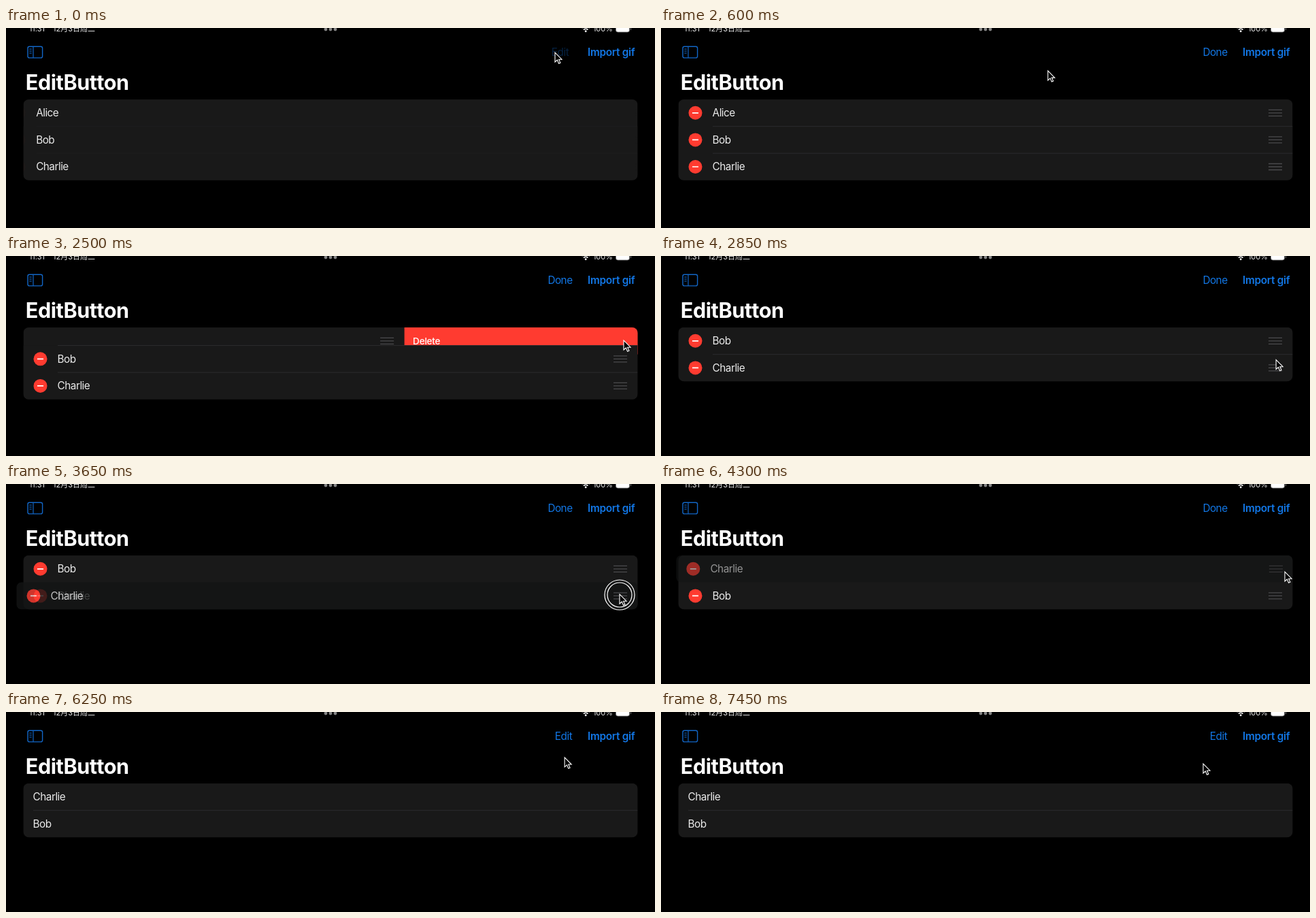
Animation of 954 by 294 pixels, one loop 7650 ms. Source, as an HTML page:

```html
<!DOCTYPE html>
<html lang="en">
<head>
<meta charset="utf-8">
<title>Editable list</title>
<style>
  html, body { margin: 0; width: 100%; height: 100%; overflow: hidden; background: #000; }
  svg { display: block; width: 954px; height: 294px; }
  text { font-family: Inter, Roboto, sans-serif; fill: #ececec; white-space: pre; }
  .name { font-size: 15.3px; letter-spacing: -.5px; }
  .title { font-size: 30.6px; font-weight: 700; letter-spacing: -.45px; fill: #fff; }
  .button { font-size: 15.3px; letter-spacing: -.5px; fill: #1277e6; text-anchor: middle; }
  .strong { font-weight: 600; letter-spacing: -.25px; text-anchor: start; }
  .delete { font-size: 13.5px; font-weight: 500; letter-spacing: -.2px; fill: #fff; }
  .status { font-size: 11px; font-family: Inter, "Noto Sans CJK SC", "Noto Sans CJK", sans-serif; }
  .line { fill: none; stroke: #1266c6; stroke-width: 1.4; }
  .separator { stroke: #2b2b2d; stroke-width: 1; }
  .handle { stroke: #4a4a4c; stroke-width: 1.3; }
</style>
</head>
<body>
<svg id="stage" viewBox="0 0 954 294"></svg>
<script>
const LOOP = 7650, STEP = 50, LAST = 7450;
const LEFT = 25.5, RIGHT = 928.5, TOP = 105, ROW = 39.6;
const ACTION = 67;

const stage = document.getElementById('stage');

const rowMarkup = (id, name, extra = '') => `
  <g id="${id}">
    ${extra}
    <g class="minus">
      <circle r="10" fill="#ff3b30"/>
      <path d="M-4.5 0H4.5" stroke="#fff" stroke-width="1.7"/>
    </g>
    <text class="name" y="5.4">${name}</text>
    <path class="handle" d="M-10 -4.5H10M-10 0H10M-10 4.5H10"/>
  </g>`;

stage.innerHTML = `
  <defs>
    <clipPath id="cardClip"><rect id="cardShape" x="${LEFT}" y="${TOP}" width="${RIGHT - LEFT}" rx="8"/></clipPath>
  </defs>
  <rect width="954" height="294"/>
  <text class="status" x="34" y="5.3" letter-spacing="-.1">11:31</text>
  <text class="status" x="69" y="5.3">12月3日周二</text>
  <g fill="#858585">
    <circle cx="470" cy="2" r="2.4"/><circle cx="477" cy="2" r="2.4"/><circle cx="484" cy="2" r="2.4"/>
  </g>
  <g fill="none" stroke="#fff" stroke-width="1.7">
    <path d="M846.5 0Q852.2 -5 858 0M849 2.5Q852.2 0 855.5 2.5"/>
    <circle cx="852.2" cy="4.8" r=".6"/>
  </g>
  <text class="status" x="863" y="5.3" letter-spacing="-.1">100%</text>
  <rect x="896.5" y="-5" width="20" height="11" rx="3" fill="#fff" stroke="#777" stroke-width=".8"/>
  <path d="M918.4 -1V3" stroke="#777"/>
  <g class="line">
    <rect x="32" y="27.3" width="21.6" height="16.6" rx="2.4"/>
    <path d="M40 27.3V44M34.3 31H37.8M34.3 34H37.8M34.3 37H37.8" stroke-width="1.2"/>
  </g>
  <text class="button" id="edit" y="41">Edit</text>
  <text class="button" id="done" y="41">Done</text>
  <text class="button strong" x="855" y="41">Import gif</text>
  <text class="title" x="28.8" y="91">EditButton</text>
  <g clip-path="url(#cardClip)">
    <rect id="card" x="${LEFT}" y="${TOP}" width="${RIGHT - LEFT}" height="${3 * ROW}" fill="#191919"/>
    ${rowMarkup('first', 'Alice')}
    <g id="action">
      <rect y="${TOP}" width="${RIGHT - LEFT}" height="${ROW}" fill="#ff3b30"/>
      <text class="delete" x="12.5" y="129.6">Delete</text>
    </g>
    <rect id="body" x="${LEFT}" width="${RIGHT - LEFT}" height="${2 * ROW}" fill="#191919"/>
    <path id="upperLine" class="separator"/>
    <path id="lowerLine" class="separator"/>
    ${rowMarkup('second', 'Bob')}
    ${rowMarkup('third', 'Charlie')}
  </g>
  ${rowMarkup('lifted', 'Charlie', `<rect class="back" y="${-ROW / 2}" height="${ROW}" rx="7" fill="#131515"/>`)}
  <g id="ring" fill="none" stroke="#fff" stroke-width="1.2">
    <circle r="22"/><circle r="18"/>
  </g>
  <path id="cursor" d="M0 0V14L3.3 11L5.6 16.2L7.9 15.2L5.6 10.2H10Z" fill="#000" stroke="#fff" stroke-width="1.1"/>
`;

const el = id => document.getElementById(id);
const set = (node, attrs) => {
  for (const key in attrs) node.setAttribute(key, attrs[key]);
};
const clamp = v => Math.max(0, Math.min(1, v));
const ramp = (t, start, length) => clamp((t - start) / length);
const ease = (t, start, length) => {
  const u = ramp(t, start, length);
  return u * u * (3 - 2 * u);
};
const mix = (a, b, u) => a + (b - a) * u;
const move = (x, y) => `translate(${x} ${y})`;

// time, x, y
const cursorPath = [
  [0, 807, 36], [300, 807, 36], [1100, 54, 121], [1500, 54, 121],
  [2050, 919, 126], [2300, 908, 124], [2550, 908, 124], [3050, 902, 168],
  [3300, 902, 168], [3600, 902, 162], [3800, 902, 162], [4000, 909, 150],
  [4200, 926, 130], [4300, 917, 129], [4450, 917, 129], [4950, 822, 15],
  [5150, 813, 36], [5600, 813, 36], [6400, 822, 70], [6600, 872, 38],
  [6900, 792, 88], [7050, 776, 76], [7200, 797, 76], [LAST, 797, 76]
];

function cursorAt(t) {
  const i = Math.max(1, cursorPath.findIndex(p => p[0] >= t));
  const [t0, x0, y0] = cursorPath[i - 1], [t1, x1, y1] = cursorPath[i];
  const u = ease(t, t0, t1 - t0);
  return [mix(x0, x1, u), mix(y0, y1, u)];
}

function drawRow(id, { y, edit, shift = 0, handleShift = shift, opacity = 1 }) {
  const row = el(id), away = 36 * (1 - edit);
  set(row, { transform: move(0, y), opacity });
  set(row.querySelector('.minus'), { transform: move(50.5 - away + shift, 0), opacity: edit ** 2 });
  set(row.querySelector('.name'), { x: 75.6 - away + shift });
  set(row.querySelector('.handle'), { transform: move(903 + away + handleShift, 0), opacity: edit ** 2 });
}

function drawLabels(t) {
  const entering = t < 2600;
  const since = entering ? t : t - 5200;
  const [oldId, newId] = entering ? ['edit', 'done'] : ['done', 'edit'];
  const [oldX, newX] = entering ? [819.5, 814.5] : [814.5, 819.5];
  set(el(oldId), { x: mix(oldX, newX, ramp(since, -150, 150)), opacity: 1 - ramp(since, -150, 210) });
  set(el(newId), { x: newX, opacity: ramp(since, 50, 200) });
}

function draw(t) {
  const edit = ease(t, -100, 450) - ease(t, 5175, 425);
  const removal = ease(t, 2375, 325);
  const swipe = -ACTION * ease(t, 1250, 335) - (RIGHT - LEFT - ACTION) * removal;
  const bodyTop = TOP + ROW * (1 - removal);
  const slot = n => bodyTop + ROW * (n + .5);

  const height = 2 * ROW + ROW * (1 - removal);
  set(el('cardShape'), { height });
  set(el('body'), { y: bodyTop });
  drawLabels(t);

  drawRow('first', { y: TOP + ROW / 2, edit, shift: swipe, opacity: removal < 1 ? 1 : 0 });
  set(el('action'), { transform: move(RIGHT + swipe, 0), opacity: removal < 1 ? 1 : 0 });

  const lift = ease(t, 3100, 200) - ease(t, 4175, 200);
  const drag = ease(t, 3850, 350);
  const held = t > 3100 && t < 4500;
  const charlieY = slot(1 - drag);
  drawRow('second', { y: slot(ease(t, 3980, 220)), edit });
  drawRow('third', {
    y: held ? slot(1) : charlieY, edit,
    opacity: held ? 1 - ease(t, 3650, 200) : 1
  });
  drawRow('lifted', {
    y: charlieY, edit, shift: -10 * lift, handleShift: drag * lift * 3,
    opacity: held ? 1 - .2 * ease(t, 3100, 200) - .22 * ease(t, 4150, 150) + .42 * ease(t, 4300, 200) : 0
  });
  const backX = LEFT - 10 * lift;
  set(el('lifted').querySelector('.back'), { x: backX, width: RIGHT - backX });

  const lineX = 40 + 36 * edit;
  const lineOpacity = edit > 0 && edit < 1 ? .25 : 1;
  const lineAt = y => `M${lineX} ${y}H${RIGHT}`;
  set(el('upperLine'), { d: lineAt(bodyTop), opacity: removal < 1 ? lineOpacity : 0 });
  set(el('lowerLine'), { d: lineAt(bodyTop + ROW), opacity: t > 3150 && t < 4400 ? 0 : lineOpacity });

  const [x, y] = cursorAt(t);
  set(el('cursor'), { transform: move(x, y) });
  set(el('ring'), { transform: move(x, y + 1), opacity: ramp(t, 3100, 100) - ramp(t, 4200, 50) });
}

const begin = performance.now();
function tick() {
  const t = (performance.now() - begin) % LOOP;
  draw(Math.min(LAST, Math.floor(t / STEP) * STEP));
  requestAnimationFrame(tick);
}
draw(0);
requestAnimationFrame(tick);
</script>
</body>
</html>
```
